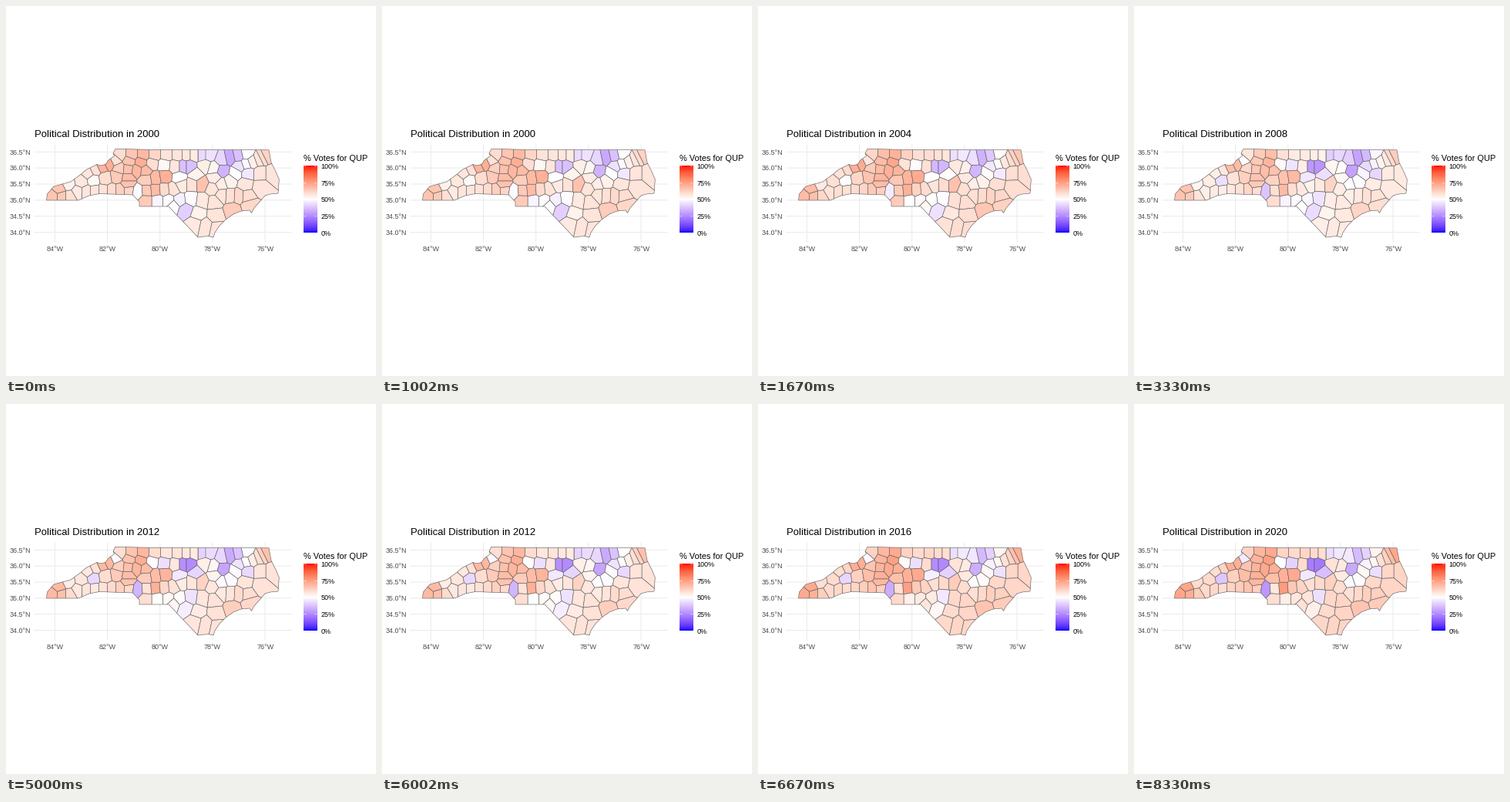
Recreate the animation shown at these times as a matplotlib script. Size 480 px wide and 480 px high, loop 10 s.

```python
import numpy as np
import matplotlib.pyplot as plt
from matplotlib.animation import FuncAnimation
from matplotlib.collections import PolyCollection
from matplotlib.patches import Polygon

SIZE, DPI = 480, 72
LOOP, STEP = 10000, 25
FRAMES = LOOP // STEP
YEARS = range(2000, 2024, 4)
SWING = [0, 1, -3, -2, 0.5, 0]  # statewide shift per election

plt.rcParams["font.family"] = "Liberation Sans"

# Counties sit in short evenly spaced rows: count, first x, y, last x, y
ROWS = [
    (6, 148, 193, 223, 193), (4, 234, 193, 264, 193), (4, 280, 199, 312, 192),
    (2, 332, 197, 338, 194), (5, 107, 217, 142, 200), (5, 160, 201, 220, 208),
    (2, 230, 208, 238, 208), (3, 258, 207, 281, 214), (4, 303, 208, 328, 199),
    (4, 298, 217, 345, 217), (4, 147, 211, 181, 214), (4, 98, 228, 144, 221),
    (3, 182, 225, 206, 221), (2, 225, 223, 246, 219), (4, 271, 223, 330, 235),
    (3, 61, 247, 83, 247), (2, 69, 237, 81, 231), (7, 93, 241, 159, 239),
    (2, 158, 223, 158, 231), (5, 171, 241, 217, 238), (3, 228, 232, 254, 231),
    (4, 182, 252, 225, 252), (3, 240, 250, 270, 254), (3, 217, 259, 249, 270),
    (2, 268, 237, 279, 231), (4, 280, 245, 313, 247), (3, 245, 282, 273, 288),
    (3, 272, 272, 316, 258),
]

# Local leanings on top of the state level: x, y, radius, first and last strength
LEANINGS = [
    (65, 242, 14, 10, 15), (113, 228, 8, -6, -25), (86, 234, 8, -8, -7),
    (130, 208, 9, 18, 14), (142, 200, 6, -2, -18), (176, 203, 22, 14, 14),
    (198, 206, 10, -17, -42), (203, 222, 13, 14, 13), (152, 228, 16, 9, 8),
    (171, 241, 8, -11, -35), (182, 246, 8, 12, -3), (195, 239, 7, 9, 14),
    (202, 253, 9, -15, -10), (234, 208, 8, -26, -50), (225, 223, 7, -8, -16),
    (246, 219, 8, -4, -24), (231, 262, 15, -18, -7), (240, 250, 7, -1, -15),
    (258, 194, 9, -18, -22), (293, 197, 18, -26, -26), (281, 214, 8, -16, -20),
    (284, 230, 13, -2, -13), (314, 217, 7, -10, -16), (254, 231, 9, 9, 2),
    (302, 262, 15, 9, 6), (337, 195, 7, 5, 12),
]

# State border, clockwise from the north-west corner
BORDER = [
    (142, 185.3), (185, 186.3), (341, 186.8), (344, 203), (350, 215),
    (354.3, 225), (353, 243), (343, 244), (336, 246), (329, 254),
    (322, 262), (318.5, 268.5), (316, 265), (305, 266), (295, 270),
    (285, 277), (277, 285), (271, 294), (269, 300), (262, 298.5),
    (249, 300), (211, 260), (173, 260), (173, 254), (164.5, 245),
    (121, 243.5), (108, 246), (94, 252), (52.5, 252), (53.5, 244),
    (62, 234), (84, 228), (97, 218.5), (104, 212.5), (118, 205.5),
    (123, 207), (129, 205.5), (133, 200), (140.5, 194.5), (139, 191),
]

RGB_XYZ = np.array([[0.4124, 0.3576, 0.1805],
                    [0.2126, 0.7152, 0.0722],
                    [0.0193, 0.1192, 0.9505]])
WHITE = RGB_XYZ.sum(axis=1)


def to_lab(rgb):
    f = np.cbrt(RGB_XYZ @ np.array(rgb) / WHITE)  # pure channels need no gamma
    return np.array([116 * f[1] - 16, 500 * (f[0] - f[1]), 200 * (f[1] - f[2])])


def from_lab(lab):
    fy = (lab[0] + 16) / 116
    f = np.array([fy + lab[1] / 500, fy, fy - lab[2] / 200])
    xyz = np.where(f > 6 / 29, f ** 3, (f - 4 / 29) * 108 / 841) * WHITE
    lin = np.clip(np.linalg.solve(RGB_XYZ, xyz), 0, 1)
    return np.where(lin > 0.0031308, 1.055 * lin ** (1 / 2.4) - 0.055, 12.92 * lin)


LOW, MID, HIGH = (to_lab(c) for c in ((0, 0, 1), (1, 1, 1), (1, 0, 0)))


def shade(share):
    """Blue through white to red, blended in Lab space."""
    t = share / 50 - 1
    end = HIGH if t > 0 else LOW
    return np.clip(from_lab(MID + (end - MID) * abs(t)), 0, 1)


def share_at(site, k):
    p = k / (len(YEARS) - 1)
    share = 57 + 4 * p + SWING[k]
    for x, y, r, first, last in LEANINGS:
        near = np.exp(-((site[0] - x) ** 2 + (site[1] - y) ** 2) / r ** 2)
        share += (first + (last - first) * p) * near
    return np.clip(share, 0, 100)


def cut(poly, point, normal):
    """Keep the part of poly behind the line through point."""
    out = []
    side = [(p - point) @ normal for p in poly]
    for i, p in enumerate(poly):
        q, a, b = poly[i - 1], side[i - 1], side[i]
        if (a > 0) != (b > 0):
            out.append(q + (p - q) * a / (a - b))
        if b <= 0:
            out.append(p)
    return out


def cell(i):
    """Area nearer to site i than to any other site."""
    poly = [np.array(c, float) for c in ((30, 160), (380, 160), (380, 320), (30, 320))]
    for j, other in enumerate(sites):
        if j != i:
            poly = cut(poly, (sites[i] + other) / 2, other - sites[i])
    return poly


sites = np.concatenate([np.linspace((x0, y0), (x1, y1), n)
                        for n, x0, y0, x1, y1 in ROWS])
cells = [cell(i) for i in range(len(sites))]
fills = [[shade(share_at(s, k)) for s in sites] for k in range(len(YEARS))]

fig = plt.figure(figsize=(SIZE / DPI, SIZE / DPI), dpi=DPI, facecolor="white")
ax = fig.add_axes([0, 0, 1, 1])
ax.axis("off")

# Grid and axis labels
grid = dict(color="#ebebeb", lw=1.07, zorder=1, snap=False)
label = dict(size=9, color="#4d4d4d")
for west in range(84, 75, -2):
    x = 63.3 + (84 - west) * 34.1
    ax.plot([x, x], [180.5, 306], **grid)
    ax.text(x, 318, f"{west}°W", ha="center", **label)
for lat in np.arange(34, 37, 0.5):
    y = 189.3 + (36.5 - lat) * 41.7
    ax.plot([37, 370], [y, y], **grid)
    ax.text(32.5, y + 3.3, f"{lat:.1f}°N", ha="right", **label)

# Map
line = dict(edgecolor="#595959", linewidth=0.57)
county_map = PolyCollection(cells, zorder=2, **line)
ax.add_collection(county_map, autolim=False)
outline = Polygon(BORDER, fill=False, zorder=3, joinstyle="round", **line)
ax.add_patch(outline)
county_map.set_clip_path(outline)

# Legend
LEFT, RIGHT, TOP, BOTTOM = 386, 403.3, 208, 294.4
ramp = np.array([[shade(s)] for s in np.linspace(100, 0, 201)])
ax.imshow(ramp, extent=(LEFT, RIGHT, BOTTOM, TOP), aspect="auto",
          interpolation="bilinear", zorder=2)
ax.text(385.8, 201, "% Votes for QUP", size=11)
for pct in range(0, 101, 25):
    y = BOTTOM + (TOP - BOTTOM) * pct / 100
    for x in (LEFT, RIGHT - 3.5):
        ax.plot([x, x + 3.5], [y, y], color="white", lw=0.55, zorder=3,
                solid_capstyle="butt", snap=False)
    ax.text(408.6, y + 3.2, f"{pct}%", size=9)

title = ax.text(37, 170, "", size=13.1)
ax.set_xlim(0, SIZE)
ax.set_ylim(SIZE, 0)


def draw(i):
    k = (i * len(YEARS) + 4) // FRAMES  # round up to the nearest step
    county_map.set_facecolor(fills[k])
    title.set_text(f"Political Distribution in {YEARS[k]}")
    return county_map, title


anim = FuncAnimation(fig, draw, frames=FRAMES, interval=STEP,
                     init_func=lambda: draw(0), repeat=True, repeat_delay=0)
plt.show()
```
